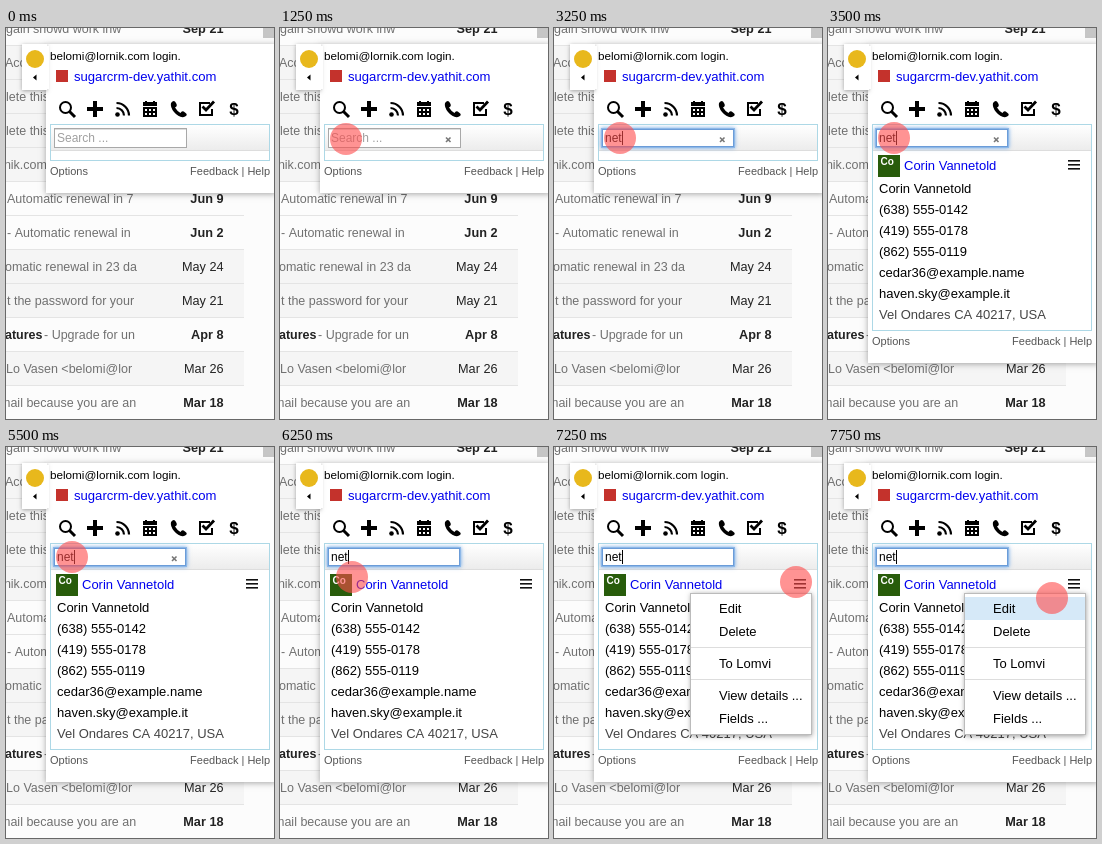
Animation of 268x391 px, one loop 8 s. Source, as an HTML page with a canvas:

```html
<!DOCTYPE html>
<html lang="en">
<head>
<meta charset="utf-8">
<title>Contact search</title>
<style>
html, body { margin: 0; width: 268px; height: 391px; overflow: hidden; background: #fff; }
canvas { display: block; }
</style>
</head>
<body>
<canvas id="stage" width="268" height="391"></canvas>
<script>
const ctx = document.getElementById('stage').getContext('2d');
const LOOP = 8000, STEP = 250;
const FAMILY = '"Liberation Sans", Arial, sans-serif';

// Pointer poses: start time, x, y, radius (0 hides it)
const POINTER = [
  [0, 0, 0, 0], [1000, 66, 154, 15], [1250, 66, 111, 16], [1500, 0, 0, 0],
  [2250, 66, 110, 16], [6000, 66, 112, 16], [6250, 72, 130, 16],
  [6500, 120, 134, 16], [6750, 225, 135, 16], [7000, 237, 135, 16],
  [7250, 242, 135, 16], [7750, 224, 151, 16]
];
const CARET_TOGGLES = [1500, 2000, 2500, 4000, 4500, 5000, 5500, 6000, 6250, 6750, 7000, 7500, 7750];

// Mail rows: subject, subject x, date, unread
const ROWS = [
  ['gain showd work inw', 0, 'Sep 21', true],
  ['Account', -1, '', false],
  ['lete this', 0, '', false],
  ['lete this', 0, '', false],
  ['lornik.com', -16, '', false],
  ['Automatic renewal in 7', 1, 'Jun 9', true],
  ['- Automatic renewal in', 1, 'Jun 2', true],
  ['omatic renewal in 23 da', -1, 'May 24', false],
  ['t the password for your', 1, 'May 21', false],
  ['- Upgrade for un', 38, 'Apr 8', true],
  ['Lo Vasen <belomi@lor', 0, 'Mar 26', false],
  ['mail because you are an', -6, 'Mar 18', true]
];
const DETAILS = ['Corin Vannetold', '(638) 555-0142', '(419) 555-0178', '(862) 555-0119',
  'cedar36@example.name', 'haven.sky@example.it', 'Vel Ondares CA 40217, USA'];
const MENU = [['Edit', 161], ['Delete', 184], ['To Lomvi', 216], ['View details ...', 248], ['Fields ...', 271]];

function rect(x, y, w, h, color) {
  ctx.fillStyle = color;
  ctx.fillRect(x, y, w, h);
}

function frame(x, y, w, h, color) {
  ctx.strokeStyle = color;
  ctx.lineWidth = 1;
  ctx.strokeRect(x + .5, y + .5, w - 1, h - 1);
}

function text(str, x, y, size, color = '#000', { bold = false, align = 'left' } = {}) {
  ctx.font = `${bold ? 'bold ' : ''}${size}px ${FAMILY}`;
  ctx.textAlign = align;
  ctx.fillStyle = color;
  ctx.fillText(str, x, y);
}

function disc(x, y, r, color) {
  ctx.fillStyle = color;
  ctx.beginPath();
  ctx.arc(x, y, r, 0, Math.PI * 2);
  ctx.fill();
}

function line(points, width, color = '#000') {
  ctx.strokeStyle = color;
  ctx.lineWidth = width;
  ctx.beginPath();
  points.forEach(([x, y]) => ctx.lineTo(x, y));
  ctx.stroke();
}

function arc(x, y, r, from, to, width, color = '#000') {
  ctx.strokeStyle = color;
  ctx.lineWidth = width;
  ctx.beginPath();
  ctx.arc(x, y, r, from, to);
  ctx.stroke();
}

function panel(x, y, w, h, blur, shade) {
  ctx.save();
  ctx.shadowColor = `rgba(0,0,0,${shade})`;
  ctx.shadowBlur = blur;
  ctx.shadowOffsetY = 1;
  rect(x, y, w, h, '#fff');
  ctx.restore();
}

function drawMail() {
  rect(0, 0, 268, 391, '#fcfcfc');
  ROWS.forEach(([subject, x, date, unread], i) => {
    const mid = 1 + i * 34;
    if (!unread) rect(0, mid - 17, 238, 34, '#f5f5f5');
    rect(0, mid + 16, 238, 1, '#e4e4e4');
    ctx.save();
    ctx.beginPath();
    ctx.rect(0, 0, 131, 391);
    ctx.clip();
    text(subject, x, mid + 4, 12.5, '#707070');
    ctx.restore();
    text(date, 217.5, mid + 4, 12.7, '#222', { bold: unread, align: 'right' });
  });
  text('atures', -1, 311, 12.5, '#222', { bold: true });
  rect(257, 0, 11, 10, '#c6c6c6');
}

function drawIcons() {
  arc(59.5, 79.5, 5.5, 0, 7, 2);
  line([[63.5, 83.5], [69, 89]], 3);

  rect(81, 79, 16, 4, '#000');
  rect(87, 73, 4, 16, '#000');

  disc(111.5, 86.5, 2.3, '#000');
  [7.5, 12.5].forEach(r => arc(110.5, 87.5, r, -Math.PI / 2, 0, 2.2));

  rect(137, 74, 14, 4, '#000');
  rect(137, 79, 14, 10, '#000');
  for (let i = 0; i < 6; i++) rect(139 + i % 3 * 4, 81 + Math.floor(i / 3) * 4, 2, 2, '#fff');
  rect(139, 73, 2, 2, '#000');
  rect(147, 73, 2, 2, '#000');

  ctx.fillStyle = '#000';
  ctx.beginPath();
  ctx.moveTo(165, 75);
  ctx.quadraticCurveTo(168, 71, 170, 75);
  ctx.quadraticCurveTo(172, 78, 169, 79.5);
  ctx.quadraticCurveTo(171, 83, 174.5, 85);
  ctx.quadraticCurveTo(176, 82, 179, 84.5);
  ctx.quadraticCurveTo(183, 87, 178, 89);
  ctx.quadraticCurveTo(173, 90, 168, 84);
  ctx.quadraticCurveTo(164, 79, 165, 75);
  ctx.fill();

  line([[204, 75], [194, 75], [194, 87], [206, 87], [206, 81]], 2);
  line([[196.5, 78.5], [200, 82], [208, 73.5]], 2.8);

  text('$', 228, 87, 17, '#000', { bold: true, align: 'center' });
}

function drawInput(t, caret) {
  const shade = ctx.createLinearGradient(0, 97, 0, 122);
  shade.addColorStop(0, '#fff');
  shade.addColorStop(1, '#ececec');
  rect(45, 97, 218, 25, shade);
  rect(45, 122, 218, 1, '#ddd');

  if (t >= 1500) {
    ctx.save();
    ctx.shadowColor = '#6fa8e8';
    ctx.shadowBlur = 4;
    rect(47, 100, 134, 20, '#8db8e8');
    ctx.restore();
    rect(49, 102, 130, 16, '#fff');
    frame(48, 101, 132, 18, '#6b9cd8');
  } else {
    rect(48, 100, 133, 20, '#fff');
    frame(48, 100, 133, 20, '#a8a8a8');
    rect(49, 101, 131, 1, '#ddd');
  }

  const typed = t < 2750 ? '' : t < 3000 ? 'ne' : 'net';
  text(typed || 'Search ...', 51, 114, 12, typed ? '#000' : '#a0a0a0');
  if (caret) rect(typed ? 51 + Math.round(ctx.measureText(typed).width) : 51, 103, 1, 14, '#000');
  if (t >= 1250 && t < 6250) {
    line([[166, 109.5], [170.5, 114]], 1.6, '#777');
    line([[170.5, 109.5], [166, 114]], 1.6, '#777');
  }
}

function drawContact(hovered) {
  rect(50, 127, 22, 22, '#285c0b');
  text('Co', 52.5, 137, 10, '#fff', { bold: true });
  text(DETAILS[0], 76, 142, 13, '#00e');
  if (hovered) rect(76, 143, Math.round(ctx.measureText(DETAILS[0]).width), 1, '#00e');
  [132, 136, 140].forEach(y => rect(240, y, 12, 1.6, '#111'));
  DETAILS.forEach((str, i) => text(str, 51, 165 + i * 21, 13, i === 6 ? '#444' : '#000'));
}

function drawPopup(t, caret) {
  const open = t >= 3500;
  const grow = open ? 170 : 0;
  panel(40, 16, 230, 149 + grow, 6, .35);
  panel(16, 16, 25, 46, 4, .35);
  rect(39, 18, 4, 43, '#fff');
  disc(29, 31, 9, '#e8b81c');
  ctx.fillStyle = '#000';
  ctx.beginPath();
  ctx.moveTo(27, 49.5);
  ctx.lineTo(30.5, 46.5);
  ctx.lineTo(30.5, 52.5);
  ctx.fill();

  text('belomi@lornik.com login.', 44, 32, 11.7);
  rect(50, 42, 12, 12, '#c4322c');
  text('sugarcrm-dev.yathit.com', 68, 53, 13.1, '#00e');
  drawIcons();

  frame(44, 96, 220, 37 + grow, '#add8e6');
  drawInput(t, caret);
  if (open) drawContact(t >= 6500 && t < 7000);

  const foot = 147 + grow;
  text('Options', 44, foot, 11, '#555');
  if (t >= 1000 && t < 1250) rect(44, foot + 1, 38, 1, '#555');
  text('Feedback | Help', 264, foot, 11, '#555', { align: 'right' });
}

function drawMenu(t) {
  panel(137, 146, 121, 142, 5, .4);
  frame(136, 146, 122, 142, '#bbb');
  if (t >= 7750) rect(137, 150, 120, 23, '#d6e9f8');
  [200, 232].forEach(y => rect(137, y, 120, 1, '#ddd'));
  MENU.forEach(([label, mid]) => text(label, 165, mid + 5, 13));
}

function drawPointer(t) {
  const [, x, y, r] = POINTER.findLast(([start]) => start <= t);
  if (r) disc(x, y, r, 'rgba(255,75,75,.6)');
  if (t >= 1500 && t < 2250) {
    const age = (t - 1500) / STEP;
    arc(66, 126, 20 + age, 0, Math.PI * 2, 1.5, `rgba(255,75,75,${.45 / 2 ** age})`);
  }
}

function draw(now) {
  const t = Math.floor(now % LOOP / STEP) * STEP;
  const caret = CARET_TOGGLES.filter(time => time <= t).length % 2 === 1;
  drawMail();
  drawPopup(t, caret);
  if (t >= 7000) drawMenu(t);
  drawPointer(t);
}

let start;
function tick(now) {
  start ??= now;
  draw(now - start);
  requestAnimationFrame(tick);
}
draw(0);
requestAnimationFrame(tick);
</script>
</body>
</html>
```
